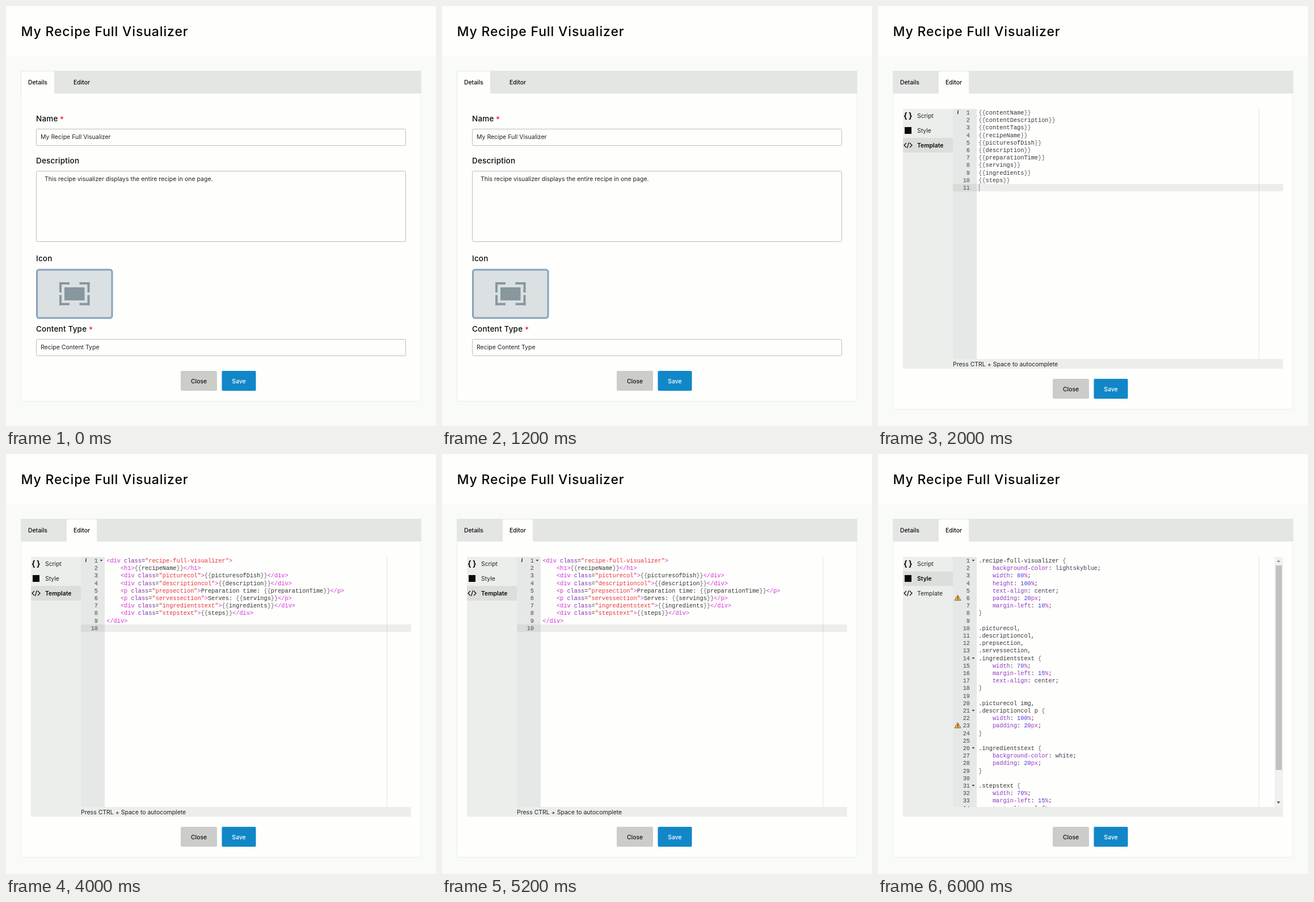
These frames come from a looping animation (758x739 px, 8 s). An HTML page with a canvas:

```html
<!DOCTYPE html>
<html lang="en">
<head>
<meta charset="utf-8">
<title>Visualizer editor</title>
<style>
html, body { margin: 0; width: 100%; height: 100%; overflow: hidden; background: #f9fbf9; }
canvas { display: block; width: 758px; height: 739px; }
</style>
</head>
<body>
<canvas id="stage" width="758" height="739"></canvas>
<script>
const ctx = document.getElementById('stage').getContext('2d');
const SANS = 'Inter, "Open Sans", sans-serif';
const MONO = '10.27px "Liberation Mono", "Courier New", monospace';
const SCENE_MS = 2000;
const LINE_H = 13.2;
const INK = '#333333';

const FIELDS = `{{contentName}}
{{contentDescription}}
{{contentTags}}
{{recipeName}}
{{picturesofDish}}
{{description}}
{{preparationTime}}
{{servings}}
{{ingredients}}
{{steps}}
`.split('\n');

const MARKUP = `<div class="recipe-full-visualizer">
    <h1>{{recipeName}}</h1>
    <div class="picturecol">{{picturesofDish}}</div>
    <div class="descriptioncol">{{description}}</div>
    <p class="prepsection">Preparation time: {{preparationTime}}</p>
    <p class="servessection">Serves: {{servings}}</p>
    <div class="ingredientstext">{{ingredients}}</div>
    <div class="stepstext">{{steps}}</div>
</div>
`.split('\n');

const STYLES = `.recipe-full-visualizer {
    background-color: lightskyblue;
    width: 80%;
    height: 100%;
    text-align: center;
    padding: 20px;
    margin-left: 10%;
}

.picturecol,
.descriptioncol,
.prepsection,
.servessection,
.ingredientstext {
    width: 70%;
    margin-left: 15%;
    text-align: center;
}

.picturecol img,
.descriptioncol p {
    width: 100%;
    padding: 20px;
}

.ingredientstext {
    background-color: white;
    padding: 20px;
}

.stepstext {
    width: 70%;
    margin-left: 15%;
    text-align: left;`.split('\n');

// Each rule is a pattern and its colour; the first alternative that matches wins.
const PLAIN = [[/[{}]+/, '#666666']];
const HTML_RULES = [
  [/<\/?\w+|>/, '#d52fd5'],
  [/class/, '#8030a8'],
  [/"[^"]*"/, '#e8343a'],
  ...PLAIN
];
const CSS_RULES = [
  [/^ +[a-z-]+(?=:)/, '#8d38c0'],
  [/\d+/, '#4a3ae4'],
  [/%|px/, '#bc30c4'],
  [/lightskyblue|center|white|left/, '#4a3a58'],
  ...PLAIN
];

function rect(x, y, w, h, color) {
  ctx.fillStyle = color;
  ctx.fillRect(x, y, w, h);
}

function box(x, y, w, h, r, fill, stroke, line = 1) {
  const d = stroke ? line / 2 : 0;
  ctx.beginPath();
  ctx.roundRect(x + d, y + d, w - 2 * d, h - 2 * d, r);
  if (fill) {
    ctx.fillStyle = fill;
    ctx.fill();
  }
  if (stroke) {
    ctx.strokeStyle = stroke;
    ctx.lineWidth = line;
    ctx.stroke();
  }
}

function path(points, fill, stroke, width = 1) {
  ctx.beginPath();
  points.forEach(([x, y], i) => i ? ctx.lineTo(x, y) : ctx.moveTo(x, y));
  if (fill) {
    ctx.closePath();
    ctx.fillStyle = fill;
    ctx.fill();
  }
  if (stroke) {
    ctx.strokeStyle = stroke;
    ctx.lineWidth = width;
    ctx.stroke();
  }
}

function text(str, x, y, { size = 10.5, weight = 400, color = '#222222', gap = 0, align = 'left' } = {}) {
  ctx.font = `${weight} ${size}px ${SANS}`;
  ctx.letterSpacing = gap + 'px';
  ctx.textAlign = align;
  ctx.fillStyle = color;
  ctx.fillText(str, x, y);
  ctx.letterSpacing = '0px';
  ctx.textAlign = 'left';
}

function label(str, y, starX) {
  text(str, 53, y, { size: 13.5, weight: 500, gap: 0.2, color: '#0a0a0a' });
  if (starX) text('*', starX, y + 1, { size: 13.5, weight: 500, color: '#ee1c24' });
}

function button(str, x, y, w, fill, color) {
  box(x, y, w, 35, 2, fill);
  text(str, x + w / 2, y + 21.5, { size: 10.4, weight: 500, color, align: 'center' });
}

function shell(bottom, tabX, tabW) {
  rect(0, 0, 758, 739, '#f9fbf9');
  rect(0, 0, 758, 88, '#fefefd');
  text('My Recipe Full Visualizer', 26.5, 53, { size: 23, weight: 500, gap: 0.85, color: '#060606' });
  box(26, 114, 706, bottom - 114, 2, '#fefefd', '#ebedeb');
  rect(26, 114, 706, 40, '#e4e6e4');
  rect(tabX, 115, tabW, 39, '#fefefd');
  const tab = { size: 10.4, weight: 500, color: '#0a0a0a' };
  text('Details', 39, 138, tab);
  text('Editor', 119, 138, tab);
  button('Close', 308, bottom - 54, 64, '#cccdc9', '#111111');
  button('Save', 380.5, bottom - 54, 60, '#1287c8', '#ffffff');
}

function fullscreenIcon() {
  const c = '#87979d';
  box(53, 462.5, 135.5, 88, 4, '#dbe0e3', '#86a3b7', 3);
  rect(103, 495, 35.5, 23, c);
  for (const right of [0, 1]) {
    for (const low of [0, 1]) {
      rect(right ? 129.5 : 94, low ? 522.5 : 486, 18, 4, c);
      rect(right ? 143.5 : 94, low ? 508.5 : 486, 4, 18, c);
    }
  }
}

function details() {
  shell(696, 27, 58);
  const line = '#bdbdbd';
  label('Name', 203, 95);
  box(53, 216, 652, 30, 2, null, line);
  text('My Recipe Full Visualizer', 61, 234);
  label('Description', 277);
  box(53, 290, 652, 125, 2, null, line);
  text('This recipe visualizer displays the entire recipe in one page.', 68, 308);
  label('Icon', 449);
  fullscreenIcon();
  label('Content Type', 573, 146);
  box(53, 586, 652, 30, 2, null, line);
  text('Recipe Content Type', 61, 604);
}

function sidebar(active) {
  rect(44, 181, 88, 457, '#ebeeea');
  rect(44, 181 + active * 25.6, 88, 25.6, '#dcdedb');
  ['Script', 'Style', 'Template'].forEach((name, i) => {
    const on = i === active;
    text(name, 69, 197 + i * 25.8, { size: 10.4, weight: on ? 600 : 400, color: on ? '#0a0a0a' : '#222222' });
  });
  const icon = { size: 14, weight: 700, color: '#0a0a0a' };
  text('{', 45, 198, icon);
  text('}', 54, 198, icon);
  rect(47, 213, 12, 12, '#0a0a0a');
  path([[50, 241], [46, 245], [50, 249]], null, '#111111', 1.3);
  path([[54.5, 240], [51.5, 250]], null, '#111111', 1.2);
  path([[56, 241], [60, 245], [56, 249]], null, '#111111', 1.3);
}

function codeLine(str, x, y, rules) {
  const step = ctx.measureText('0').width;
  const put = (part, at, color) => {
    ctx.fillStyle = color;
    ctx.fillText(part, x + at * step, y);
  };
  const scan = new RegExp(rules.map(r => `(${r[0].source})`).join('|'), 'g');
  let end = 0;
  for (const m of str.matchAll(scan)) {
    put(str.slice(end, m.index), end, INK);
    put(m[0], m.index, rules[m.slice(1).findIndex(g => g !== undefined)][1]);
    end = m.index + m[0].length;
  }
  put(str.slice(end), end, INK);
}

function warning(y) {
  path([[140.5, y - 5], [146, y + 4.5], [135, y + 4.5]], '#f3b04c', '#8f6a3c', 1);
  rect(140, y - 2, 1.2, 3.5, '#4a2a10');
  rect(140, y + 2.3, 1.2, 1.2, '#4a2a10');
}

function editor(side, lines, rules, { activeLine = -1, folds = [], info = true } = {}) {
  shell(710, 107, 53);
  sidebar(side);
  rect(132, 181, 42, 440, '#e5e8e6');
  rect(132, 621, 582, 17, '#eceeeb');
  ctx.save();
  ctx.beginPath();
  ctx.rect(132, 181, 582, 440);
  ctx.clip();
  if (activeLine >= 0) {
    const y = 181 + activeLine * LINE_H;
    rect(132, y, 42, LINE_H, '#d9dbd9');
    rect(174, y, 540, LINE_H, '#ededec');
  }
  rect(671, 181, 1, 440, 'rgba(0, 0, 0, 0.1)');
  ctx.font = MONO;
  lines.forEach((str, i) => {
    const y = Math.round(191 + i * LINE_H);
    ctx.textAlign = 'right';
    ctx.fillStyle = '#444444';
    ctx.fillText(i + 1, 162, y);
    ctx.textAlign = 'left';
    codeLine(str, 177.3, y, rules);
  });
  for (const n of folds) {
    const y = Math.round(186 + (n - 1) * LINE_H);
    path([[165.5, y], [170.5, y], [168, y + 3]], '#444444');
  }
  if (info) {
    ctx.font = 'italic bold 10.5px "Liberation Serif", "Noto Serif", serif';
    ctx.fillStyle = '#222222';
    ctx.fillText('i', 139.5, 190);
  }
  ctx.restore();
  if (info) text('Press CTRL + Space to autocomplete', 132, 633.5);
}

function fields() {
  editor(2, FIELDS, PLAIN, { activeLine: 10 });
  rect(178, 313, 1, 13, '#888888');
}

function markup() {
  editor(2, MARKUP, HTML_RULES, { activeLine: 9, folds: [1] });
}

function styles() {
  editor(1, STYLES, CSS_RULES, { folds: [1, 14, 21, 26, 31], info: false });
  warning(253);
  warning(477.5);
  rect(699, 181, 15, 440, '#f0f1f0');
  rect(701, 196, 11, 360, '#c1c2c1');
  path([[703, 190], [709, 190], [706, 186.5]], '#8a8a8a');
  path([[703, 611.5], [709, 611.5], [706, 615]], '#444444');
}

const scenes = [details, fields, markup, styles];
const start = performance.now();

function draw() {
  const t = performance.now() - start;
  scenes[Math.floor(t / SCENE_MS) % scenes.length]();
  requestAnimationFrame(draw);
}
draw();
</script>
</body>
</html>
```
